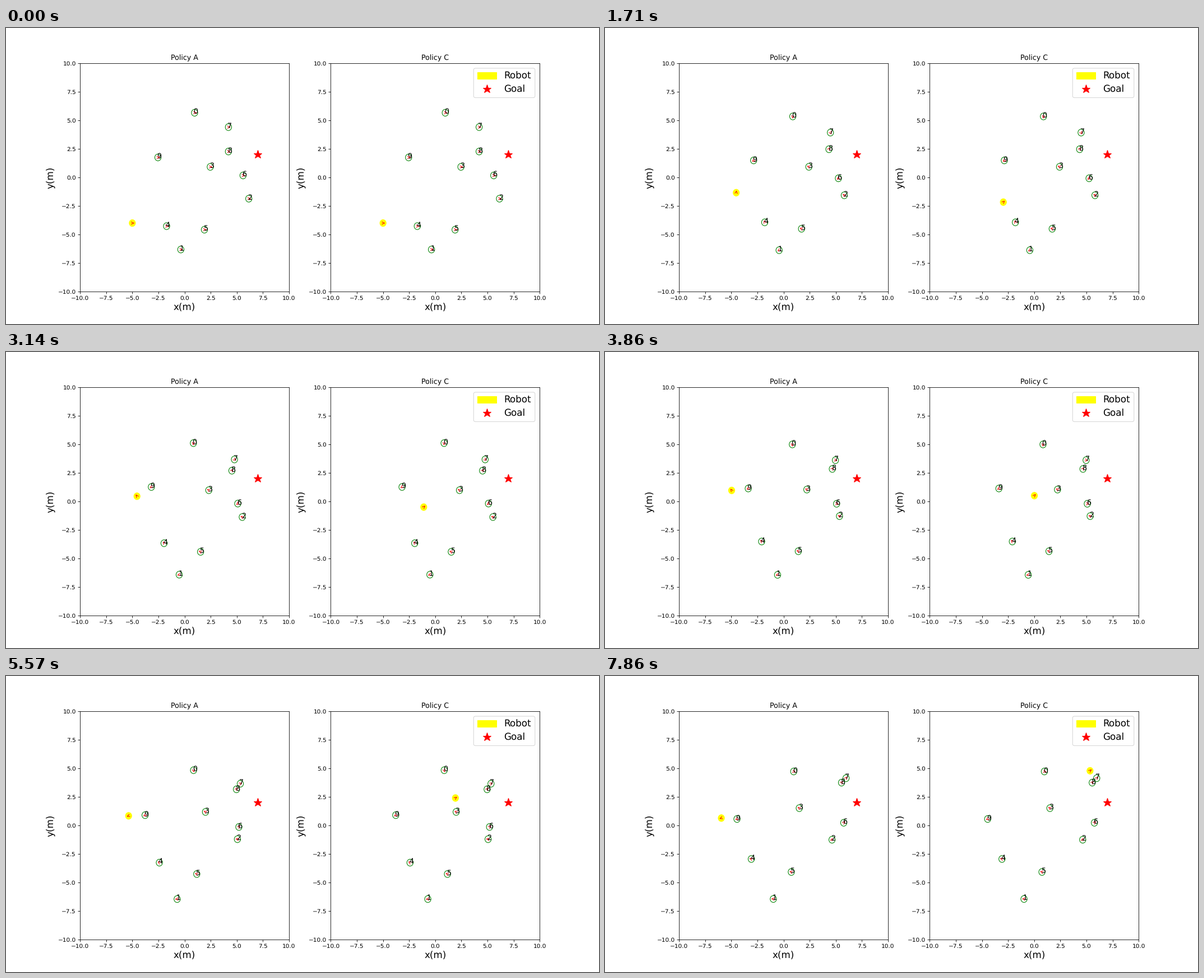
Write a matplotlib script that moves like this. It is 1058x529 px and loops after 8 s.

```python
import numpy as np
import matplotlib.pyplot as plt
from matplotlib.animation import FuncAnimation
from matplotlib.lines import Line2D
from matplotlib.patches import ArrowStyle, Circle, FancyArrowPatch, FancyBboxPatch, Rectangle

LOOP_MS, FRAMES = 8000, 56
WIDTH, HEIGHT, DPI = 1058, 529, 1058 / 14
RADIUS = 0.3
LABEL_SHIFT = (-0.10, -0.09)
STEPS = np.arange(FRAMES)

# Each person drifts along a gentle arc: start, middle and end in metres.
ARCS = [
    [(0.96, 5.68), (0.84, 5.00), (0.97, 4.74)],
    [(-0.36, -6.32), (-0.58, -6.44), (-0.98, -6.45)],
    [(6.15, -1.86), (5.34, -1.28), (4.64, -1.25)],
    [(2.46, 0.93), (2.22, 1.05), (1.50, 1.52)],
    [(-1.72, -4.27), (-2.11, -3.50), (-3.09, -2.94)],
    [(1.90, -4.58), (1.40, -4.36), (0.74, -4.08)],
    [(5.60, 0.18), (5.08, -0.20), (5.76, 0.24)],
    [(4.20, 4.42), (4.98, 3.62), (5.98, 4.15)],
    [(4.20, 2.28), (4.68, 2.87), (5.55, 3.76)],
    [(-2.55, 1.76), (-3.40, 1.13), (-4.46, 0.57)],
]

# Each robot drives straight legs between (step, x, y) points.
LEGS_A = [(0, -5, -4), (17, -4.28, 0.12), (27, -4.97, 0.97), (55, -5.96, 0.65)]
LEGS_C = [(0, -5, -4), (27, 0.01, 0.51), (34, 1.13, 1.85), (55, 5.34, 4.80)]


def arc_path(points):
    curve = np.polyfit([0, STEPS[-1] / 2, STEPS[-1]], points, 2)
    return np.vander(STEPS, 3) @ curve


def leg_path(legs):
    step, x, y = np.transpose(legs)
    return np.column_stack([np.interp(STEPS, step, x), np.interp(STEPS, step, y)])


class Agent:
    def __init__(self, ax, path, label="", **style):
        self.path = path
        dx, dy = np.diff(path, axis=0).T
        self.heading = np.append(0, np.arctan2(dy, dx))
        self.body = ax.add_patch(Circle((0, 0), RADIUS, **style))
        self.label = ax.text(0, 0, label, color="black", fontsize=12)
        self.arrow = ax.add_patch(FancyArrowPatch(
            (0, 0), (RADIUS, 0), color="red",
            arrowstyle=ArrowStyle("->", head_length=4, head_width=2)))

    def move(self, step):
        center = self.path[step]
        angle = self.heading[step]
        self.body.center = center
        self.label.set_position(center + LABEL_SHIFT)
        self.arrow.set_positions(center, center + RADIUS * np.array([np.cos(angle), np.sin(angle)]))


def star(x, y, **kwargs):
    return Line2D([x], [y], color="red", marker="*", linestyle="None", markersize=15, **kwargs)


def build_panel(ax, title, robot_path):
    ticks = np.arange(-10, 10.1, 2.5)
    ax.set(xlim=(-10, 10), ylim=(-10, 10), xticks=ticks, yticks=ticks)
    ax.set_title(title, fontsize=12)
    ax.set_xlabel("x(m)", fontsize=16)
    ax.set_ylabel("y(m)", fontsize=16)
    ax.add_line(star(7, 2))
    robot = Agent(ax, robot_path, color="yellow")
    people = [Agent(ax, arc_path(arc), str(n), fill=False, edgecolor="green")
              for n, arc in enumerate(ARCS)]
    return [robot] + people


def draw_key(fig):
    """Compact key, laid out in pixels from the bottom left."""
    em = 16 * DPI / 72
    left, text_x = 841, 888
    robot_y, goal_y = 438, 414.5
    on_top = dict(transform=None, zorder=5)
    fig.add_artist(FancyBboxPatch(
        (834.3, 404.5), 109.5, 52.6, boxstyle="round,pad=0,rounding_size=0.2",
        mutation_scale=em, facecolor="white", edgecolor="0.8", alpha=0.8, **on_top))
    fig.add_artist(Rectangle((left, robot_y), 2 * em, 0.7 * em, color="yellow", **on_top))
    fig.add_artist(star(left + em, goal_y + 0.35 * em, **on_top))
    for y, name in [(robot_y, "Robot"), (goal_y, "Goal")]:
        fig.text(text_x, y, name, fontsize=16, **on_top)


plt.rcParams["font.family"] = "DejaVu Sans"
plt.rcParams["text.hinting"] = "none"
fig, (ax_a, ax_c) = plt.subplots(1, 2, figsize=(WIDTH / DPI, HEIGHT / DPI), dpi=DPI)
fig.subplots_adjust(left=0.125, right=0.9, bottom=0.11, top=0.88, wspace=0.2)

agents = build_panel(ax_a, "Policy A", leg_path(LEGS_A))
agents += build_panel(ax_c, "Policy C", leg_path(LEGS_C))
draw_key(fig)


def update(step):
    for agent in agents:
        agent.move(step)
    return []


anim = FuncAnimation(fig, update, frames=FRAMES, interval=LOOP_MS / FRAMES,
                     repeat=True, repeat_delay=0, blit=False)
plt.show()
```
